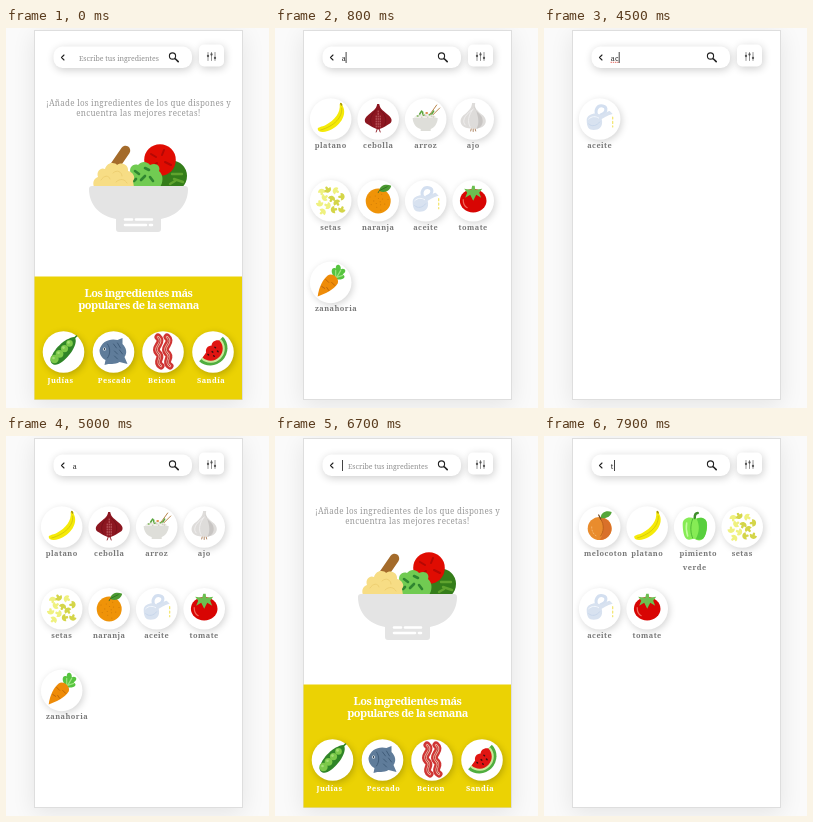
These frames come from a looping animation (263 by 380 pixels, 8000 ms). An HTML page with a canvas:

```html
<!DOCTYPE html>
<html lang="es">
<head>
<meta charset="utf-8">
<title>Recetas</title>
<style>
html, body { margin: 0; width: 100%; height: 100%; overflow: hidden; background: #fafafa; }
canvas { display: block; width: 263px; height: 380px; }
</style>
</head>
<body>
<canvas id="stage"></canvas>
<script>
const W = 263, H = 380, LOOP = 8000;
const canvas = document.getElementById('stage');
const dpr = window.devicePixelRatio || 1;
canvas.width = W * dpr;
canvas.height = H * dpr;
const c = canvas.getContext('2d');
const SERIF = '"Noto Serif", serif';

function fill(color, d) {
  c.fillStyle = color;
  c.fill(new Path2D(d));
}
function line(color, width, d) {
  c.strokeStyle = color;
  c.lineWidth = width;
  c.lineCap = c.lineJoin = 'round';
  c.stroke(new Path2D(d));
}
function dashed(dash, color, width, d) {
  c.setLineDash(dash);
  line(color, width, d);
  c.setLineDash([]);
}
function oval(color, x, y, rx, ry = rx, turn = 0) {
  c.fillStyle = color;
  c.beginPath();
  c.ellipse(x, y, rx, ry, turn, 0, Math.PI * 2);
  c.fill();
}
function rect(color, x, y, w, h, r = 0) {
  c.fillStyle = color;
  c.beginPath();
  c.roundRect(x, y, w, h, r);
  c.fill();
}
function at(x, y, draw, turn = 0) {
  c.save();
  c.translate(x, y);
  c.rotate(turn);
  draw();
  c.restore();
}
function shadowed(alpha, blur, dx, dy, draw) {
  c.save();
  c.shadowColor = `rgba(0,0,0,${alpha})`;
  c.shadowBlur = blur * dpr;
  c.shadowOffsetX = dx * dpr;
  c.shadowOffsetY = dy * dpr;
  draw();
  c.restore();
}
function text(str, x, y, size, color, { weight = 400, align = 'center', gap = 0 } = {}) {
  c.font = `${weight} ${size}px ${SERIF}`;
  c.letterSpacing = gap + 'px';
  c.textAlign = align;
  c.fillStyle = color;
  c.fillText(str, x, y);
}
function label(str, x, y, color, align) {
  text(str, x, y, 7.4, color, { weight: 700, gap: .45, align });
}

// Food icons, drawn around their own centre
const food = {
  platano() {
    fill('#f5ea08', 'M9-15L11-16L12-13C17-4 9 8-3 12C-8 14-13 13-13 10C-13 8-9 8-5 6C4 1 10-6 9-15Z');
    line('#cfc00e', .8, 'M11-11C12-2 4 7-10 11');
    line('#a3920f', 1.4, 'M10-15.5L11-14');
  },
  cebolla() {
    fill('#8c1620', 'M-1-15L1-15C2-9 6-8 10-4C15 0 14 4 10 5.5C6 8 4 9 0 10.5C-4 9-6 8-10 5.5C-14 4-15 0-10-4C-6-8-2-9-1-15Z');
    line('#6f1019', .7, 'M-2-9C-8-4-9 2-6 7M2-9C8-4 9 2 6 7');
    dashed([1, 1.5], '#d0777a', .8, 'M-2-3L-2 8M0-8L0 9M2-3L2 8');
    line('#8c1620', .9, 'M-1 10L-2 13M1 10L2 13');
  },
  arroz() {
    line('#b9854a', 1, 'M3-3L11-14M6-3L14-11');
    fill('#f0efea', 'M-12-1C-9-7 8-7 11-1Z');
    for (let i = 0; i < 9; i++) oval(i % 3 ? '#d5d3c8' : '#6fae48', -8 + i * 2, -3 + Math.sin(i * 4) * 1.5, 1.2, .8, i);
    oval('#e08a4a', 1, -6, 1.4, 1);
    line('#59a53d', 1.5, 'M-6-5L-4-8M-3-5L-3-7M6-5L8-8');
    fill('#deded9', 'M-13-1L12-1C12 5 8 9 5 10L5 12L-5 12L-5 10C-9 9-13 5-13-1Z');
  },
  ajo() {
    fill('#dedcda', 'M-1-16L2-16C1-10 4-9 8-5C14-1 14 5 9 8C5 10-5 10-9 8C-14 5-14-1-8-5C-4-9-2-10-1-16Z');
    fill('#c8c5c3', 'M1-13C1-8 8-5 9-1C11 5 7 9 3 10C7 4 5-4 1-13Z');
    line('#f3f2f1', .8, 'M0-10C-5-4-6 3-3 8M-1-9C-10-3-11 3-8 6');
    line('#a87b56', .9, 'M-2 10L-2.5 12M0 10L0 12.5M2 10L2.5 12');
  },
  setas() {
    const spots = [-9, -9, -3, -11, 5, -10, 11, -4, -6, -3, 1, -2, -11, 3, 6, 2, -3, 5, 3, 9, -8, 11, 11, 9];
    for (let i = 0; i < spots.length; i += 2) {
      const color = i % 4 ? '#d4d548' : '#eff17f';
      at(spots[i], spots[i + 1], () => {
        rect(color, -1.2, -.5, 2.4, 4, 1);
        fill(color, 'M-3.7 1C-3.7-4.2 3.7-4.2 3.7 1Z');
      }, i * 1.3);
    }
  },
  naranja() {
    oval('#ef9308', 0, .3, 12.5);
    for (let i = 0; i < 14; i++) {
      const r = 2 + i * .62, a = i * 2.4;
      oval('#cf7b08', r * Math.cos(a), 1 + r * Math.sin(a), .55);
    }
    fill('#4b9a32', 'M1-10C2-16 8-17 13-15C12-10 6-7 1-10Z');
    line('#2c6d20', .8, 'M0-8L1-10L9-14');
  },
  aceite() {
    line('#d3dff0', 3, 'M-2-2C-6-9-2-14 3-13C8-12 7-6 1-4');
    fill('#d8e2f0', 'M-13 1C-13-5-3-7 0-4C4-4 7-8 10-8L13-5C8-4 6-2 2 0C4 8-1 11-6 11C-11 11-13 8-13 1Z');
    line('#c6d5ea', .9, 'M-11 5C-8 8-3 7 0 3');
    line('#f4f8fd', 1, 'M-11 0C-8-3-4-3-1-1');
    dashed([2, 2.4], '#f3e56a', 1.2, 'M13-2L13 8');
  },
  tomate() {
    oval('#d80503', 0, 0, 13.3, 11.7);
    line('#f06a5c', 1.2, 'M-10-1C-10 3-8 6-6 7');
    fill('#6cbf50', 'M-1-15L1.5-15L2-11L9-12L6-8L8-3L3-6L0 0L-3-6L-8-3L-6-8L-9-12L-2-11Z');
  },
  zanahoria() {
    fill('#56c43f', 'M4-5C-1-10 1-16 5-14C5-20 11-18 10-13C14-15 17-11 12-8C16-6 13-2 6-3Z');
    line('#9be57f', 1.2, 'M5-5L5-12M6-5L10-12M6-5L12-7');
    fill('#ee8b08', 'M-3-7C2-10 9-4 7 1C3 7-5 11-13 14C-12 5-8-3-3-7Z');
    line('#b9640a', .9, 'M-5-3L-2 0M4 3L1 0M-9 4L-6 6M-2 8L-4 5');
  },
  melocoton() {
    oval('#e98c2d', 0, 1.5, 12, 11.5);
    fill('#d9702a', 'M1-9C11-9 15 3 9 9C6 12 2 13 0 13C5 6 5-3 1-9Z');
    line('#b65a1b', .9, 'M1-8C5-2 4 5 1 9');
    fill('#55a63a', 'M1-9C1-15 7-17 12-15C11-10 6-8 1-9Z');
    line('#6d4520', 1.2, 'M1-8L-1-12');
    dashed([1, 2], '#f7bd76', 1, 'M-8 0C-8 4-6 8-3 9');
  },
  pimiento() {
    fill('#86ec55', 'M0-8C-5-11-12-9-12-3C-12 3-11 10-8 12C-5 14-2 11 0 12C3 14 7 14 9 11C12 5 13-2 12-5C10-10 5-10 0-8Z');
    fill('#58cf3d', 'M2-8C7-11 12-8 12-4C13 2 11 10 8 12C5 13 3 13 1 12C5 5 5-2 2-8Z');
    line('#c5fb9f', 1.5, 'M-8-4C-9 1-8 6-7 9');
    line('#43ae2f', .8, 'M-2-8C-5-1-4 7-2 11');
    line('#3e8d2b', 2.5, 'M0-9C0-12 1-14 3-14');
  },
  judias() {
    fill('#2f8527', 'M-13 8C-11-2 1-14 11-15C16-9 5 7-5 12C-9 14-13 12-13 8Z');
    for (let i = 0; i < 4; i++) oval('#7cc94a', -9 + i * 5, 7 - i * 5.2, 4.2 - i * .3);
    for (let i = 0; i < 4; i++) oval('#a4dd74', -10 + i * 5, 6 - i * 5.2, 1.3);
    line('#2f8527', 1.6, 'M11-14L13-16');
  },
  pescado() {
    fill('#5f7c9a', 'M-14-2C-12-11-3-14 4-12L9-14L9-8C13-4 14 1 11 5L14 12L6 10C1 13-4 11-9 13L-8 8C-12 6-14 2-14-2Z');
    line('#3d5975', .9, 'M-6-8C-3-4-3 2-6 6M0-8L3-4M4-9L7-4M1-1L4 2M6-2L9 2M1 4L4 7');
    oval('#fff', -9, -3, 1.6);
    oval('#23394f', -9, -3, .9);
  },
  beicon() {
    for (const x of [-5, 4]) {
      const d = `M${x},-15 C${x + 7},-9 ${x - 6},-5 ${x},1 C${x + 6},6 ${x - 4},9 ${x + 3},14`;
      line('#cf3434', 7, d);
      line('#f3b3a2', 2.4, d);
      line('#a92428', .8, d);
    }
  },
  sandia() {
    at(-2, -3, () => {
      fill('#4fae3f', 'M-17 0A17 16 0 0 0 17 0Z');
      fill('#c9e99a', 'M-14 0A14 13.5 0 0 0 14 0Z');
      fill('#e01512', 'M-12 0A12 11.5 0 0 0 12 0C9-4 5-4 3-2C0-5-4-4-6-1Z');
      for (const [x, y] of [[-6, 2], [-1, 3], [4, 2], [-3, 7], [3, 6.5]]) oval('#3c1111', x, y, .8, 1.2);
    }, -.8);
  }
};

function bubble(name, x, y, alpha = .17) {
  shadowed(alpha, 7, 1.5, 2, () => oval('#fff', x, y, 20.8));
  at(x, y, food[name]);
}

function bowl() {
  // cucumber
  oval('#347d1a', 165.5, 148, 15.5);
  line('#5fa32e', 2.4, 'M166 146L176 146M168 151L177 154M164 156L169 153');
  // tomato
  oval('#e00c02', 154, 132, 15.8);
  line('#b40804', 2, 'M145 126L150 129M158 122L156 127M159 134L165 137M146 139L151 135');
  // spoon
  line('#a46b2b', 9.5, 'M108.5 138.5L119.5 122.5');
  // lettuce
  fill('#71cb52', 'M123 159C120 153 121 148 125 146C122 140 127 135 132 137C136 132 142 134 144 137C150 134 155 138 153 143C158 147 157 155 154 159Z');
  line('#2f8630', 2.6, 'M129 143L133 146M139 140L143 142M135 152L139 148M144 149L147 153M128 153L130 151');
  // pasta
  fill('#f7dd85', 'M88 159C86 153 89 150 92 149C90 143 95 139 99 141C101 134 109 134 111 137C117 133 123 138 122 143C127 144 130 149 127 153L128 159Z');
  line('#eccd70', .9, 'M95 152C98 147 103 147 104 151M107 145C111 141 116 144 116 148M110 154C114 150 119 151 121 155');
  // dish
  fill('#e4e4e4', 'M86 158L179 158Q182 158 182 161C182 177 171 188 155 191L155 201Q155 204 152 204L113 204Q110 204 110 201L110 191C94 188 83 177 83 161Q83 158 86 158Z');
  line('#fff', 2.6, 'M119 191.5L126 191.5M130 191.5L146 191.5M119 197L140 197M144 197L146 197');
}

function home() {
  text('Escribe tus ingredientes', 73, 32.5, 7, '#8f8f8f', { align: 'left' });
  const intro = { gap: .28 };
  text('¡Añade los ingredientes de los que dispones y', 132.5, 78, 8, '#999', intro);
  text('encuentra las mejores recetas!', 132.5, 88, 8, '#999', intro);
  bowl();
  rect('#ebd204', 28.5, 248.5, 207.5, 123);
  const title = { weight: 700, gap: -.5 };
  text('Los ingredientes más', 132.5, 269, 11, '#fff', title);
  text('populares de la semana', 132.5, 281, 11, '#fff', title);
  const top = [['judias', 'Judías', 57.5, 54.5], ['pescado', 'Pescado', 107.5, 108.5],
    ['beicon', 'Beicon', 157, 156], ['sandia', 'Sandía', 207, 205]];
  for (const [icon, name, x, nameX] of top) {
    bubble(icon, x, 324, .22);
    label(name, nameX, 355, '#fff');
  }
}

const results = {
  a: ['platano', 'cebolla', 'arroz', 'ajo', 'setas', 'naranja', 'aceite', 'tomate', 'zanahoria'],
  ac: ['aceite'],
  t: ['melocoton', 'platano', 'pimiento', 'setas', 'aceite', 'tomate']
};

function grid(query) {
  const gray = '#777';
  results[query].forEach((name, i) => {
    const x = 55.7 + (i % 4) * 47.5, y = 91 + Math.floor(i / 4) * 81.7;
    bubble(name, x, y);
    if (name.length > 8) label(name, 40, y + 29, gray, 'left');
    else if (name === 'pimiento') {
      label(name, x + 3.5, y + 29, gray);
      label('verde', x, y + 43, gray);
    } else label(name, x, y + 29, gray);
  });
  text(query, 66.7, 33, 7.2, '#222', { align: 'left', gap: .3 });
}

function phone() {
  rect('#fafafa', 0, 0, W, H);
  shadowed(.09, 22, 0, 5, () => rect('#fff', 28, 2, 209, 370));
  rect('#dedede', 28, 2, 209, 370);
  rect('#fff', 29, 3, 207, 368);
}

function searchBar() {
  shadowed(.2, 8, 1, 2, () => rect('#fff', 47.5, 18.5, 138.5, 21.5, 9));
  shadowed(.2, 8, 1, 2, () => rect('#fff', 193, 16.5, 25, 22, 5));
  line('#222', 1.1, 'M58 27L55.5 29.5L58 32');
  line('#222', 1.1, 'M169.6 28A3.1 3.1 0 1 1 163.4 28A3.1 3.1 0 1 1 169.6 28M168.9 30.4L169.5 31');
  line('#222', 1.6, 'M169.8 31.2L172.2 33.6');
  line('#777', .8, 'M202 24.5L202 32.5M205.5 24.5L205.5 32.5M209 24.5L209 32.5');
  for (const [x, y] of [[202, 28], [205.5, 26.5], [209, 30]]) oval('#555', x, y, 1.15);
}

// [start, search text]
const typing = [[0, ''], [800, 'a'], [2500, 'ac'], [4600, 'a'], [6700, ''], [7900, 't']];
// [caret on, caret off]
const caretOn = [[500, 1300], [1800, 2300], [2500, 3000], [3500, 4000],
  [4500, 5000], [5500, 6000], [6500, 7000], [7500, 8000]];
const caretX = { '': 67, a: 70.6, ac: 74.7, t: 70 };

function draw(t) {
  const query = typing.filter(([start]) => start <= t).pop()[1];
  c.setTransform(dpr, 0, 0, dpr, 0, 0);
  phone();
  searchBar();
  if (query) grid(query);
  else home();
  if (query === 'ac' && t >= 3500) dashed([.6, 1.6], '#e25a50', .9, 'M67 34.3L75 34.3');
  if (caretOn.some(([on, off]) => t >= on && t < off)) rect('#444', caretX[query], 24, 1, 11);
}

const begin = performance.now();
function tick() {
  draw((performance.now() - begin) % LOOP);
  requestAnimationFrame(tick);
}
tick();
</script>
</body>
</html>
```
